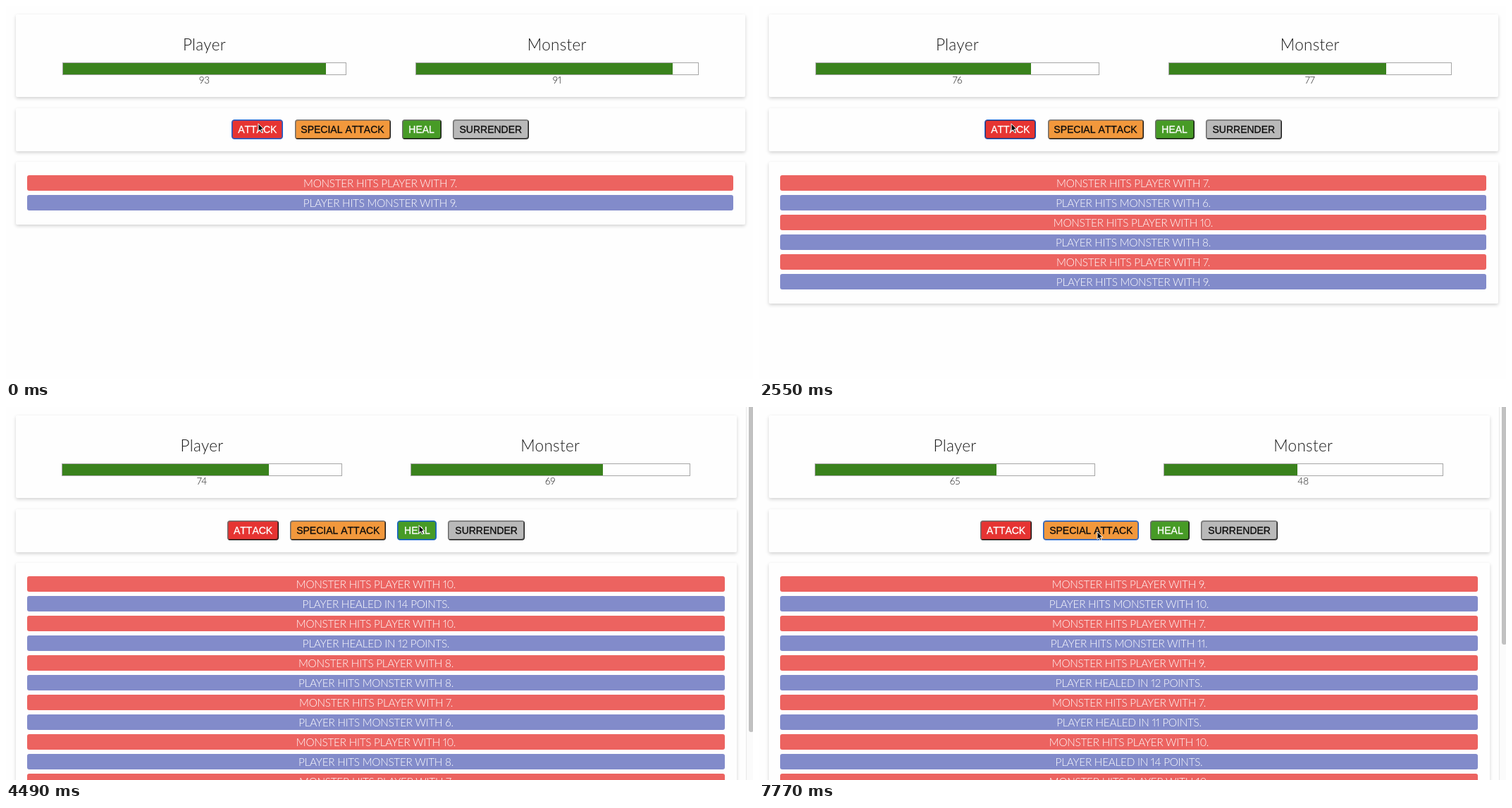
These frames come from a looping animation (1060 px wide and 529 px high, 8000 ms). An HTML page:

```html
<!DOCTYPE html>
<html lang="en">
<head>
<meta charset="utf-8">
<title>Monster battle</title>
<style>
html, body { margin: 0; width: 100%; height: 100%; overflow: hidden; background: #fefefe; }
body {
  position: relative; font-family: Lato, sans-serif; font-weight: 300;
  font-variant-numeric: proportional-nums; color: #1a1a1a;
}
#stage { position: absolute; left: 0; top: 0; width: 1060px; height: 529px; overflow: hidden; }
#stage * { box-sizing: border-box; }
.panel, .name, .bar, .health, .row, button, #cursor, #scroll, #thumb { position: absolute; }
.panel { left: 14px; background: #fefefe; border-radius: 2px; box-shadow: 0 2px 5px rgba(0, 0, 0, .18); }
.name, .health, .row { text-align: center; white-space: nowrap; }
.name { top: 40px; line-height: 29px; font-size: 22.5px; letter-spacing: .3px; }
.bar { top: 80px; height: 18px; border: 1px solid #a6a6a6; background: #fefefe; }
.fill { height: 100%; background: #3a821d; }
.health { top: 96px; line-height: 18px; font-size: 13.5px; }
button {
  --lit: #6c6c6c; --shade: #161616;
  top: 161px; height: 28px; margin: 0; padding: 0;
  border: 1px solid; border-color: var(--lit) var(--shade) var(--shade) var(--lit); border-radius: 4px;
  box-shadow: inset 1px 1px rgba(108, 108, 108, .5), inset -1px -1px rgba(22, 22, 22, .5);
  font: 14px/26px "Liberation Sans", Arial, sans-serif; font-kerning: none; color: #0c0c0c;
  -webkit-text-stroke: .3px; white-space: nowrap; outline: none;
}
button.light { color: #fff; }
button.focus { --lit: #1560d0; --shade: #1560d0; box-shadow: inset 0 0 0 1px rgba(21, 96, 208, .6); }
button.press { box-shadow: inset 0 0 0 1px rgba(20, 50, 100, .7); }
.row {
  left: 30px; height: 22px; line-height: 22px; border-radius: 3px;
  font-size: 15.3px; letter-spacing: -.25px; color: #fff; background: #828bca;
}
.row.monster { background: #ec6360; }
#scroll { left: 1050px; top: 0; width: 10px; height: 529px; background: #fbfbfb; border-left: 1px solid #e9e9e9; }
#thumb { left: 3px; top: 0; width: 7px; background: #c1c1c1; border-radius: 0 0 4px 4px; }
#cursor { width: 12px; height: 16px; overflow: visible; }
</style>
</head>
<body>
<div id="stage"></div>
<script>
const LOOP = 8000;
const ROW_TOP = 240, ROW_PITCH = 28;

// Each turn: start time, button used, amount for the player, monster's hit
const TURNS = [
  { at: 0, action: 'attack', amount: 9, hit: 7 },
  { at: 900, action: 'attack', amount: 8, hit: 10 },
  { at: 1800, action: 'attack', amount: 6, hit: 7 },
  { at: 2700, action: 'attack', amount: 8, hit: 8 },
  { at: 3600, action: 'heal', amount: 12, hit: 10 },
  { at: 4490, action: 'heal', amount: 14, hit: 10 },
  { at: 5380, action: 'heal', amount: 11, hit: 7 },
  { at: 6280, action: 'heal', amount: 12, hit: 9 },
  { at: 7020, action: 'special', amount: 11, hit: 7 },
  { at: 7770, action: 'special', amount: 10, hit: 9 },
];

const PRESSES = [[1650, 1800], [2550, 2700], [4340, 4490], [5240, 5380], [6130, 6280]];

// time, x, y
const CURSOR = [
  [0, 357, 166], [2850, 358, 166], [3000, 521, 170], [3150, 584.5, 167],
  [6430, 578, 170], [6580, 480, 177], [6720, 478.5, 175.5],
];

const BUTTONS = [
  { id: 'attack', text: 'ATTACK', x: 320.3, w: 73, color: '#e63432', light: true },
  { id: 'special', text: 'SPECIAL ATTACK', x: 409.5, w: 136, color: '#f2983c' },
  { id: 'heal', text: 'HEAL', x: 561.6, w: 56, color: '#479b26', light: true },
  { id: 'surrender', text: 'SURRENDER', x: 633.6, w: 108.5, color: '#b9b9b9' },
];

const stage = document.getElementById('stage');

function add(tag, className, parent = stage, text = '') {
  const node = document.createElement(tag);
  node.className = className;
  node.textContent = text;
  parent.append(node);
  return node;
}

function place(node, box) {
  for (const key in box) node.style[key] = box[key] + 'px';
}

const panels = [[12, 117], [145, 61], [221, 89]].map(([top, height]) => {
  const panel = add('div', 'panel');
  place(panel, { top, height });
  return panel;
});

function addFighter(title) {
  const name = add('div', 'name', stage, title);
  const bar = add('div', 'bar');
  return { name, bar, fill: add('div', 'fill', bar), health: add('div', 'health') };
}
const player = addFighter('Player');
const monster = addFighter('Monster');

const buttons = BUTTONS.map(spec => {
  const node = add('button', spec.light ? 'light' : '', stage, spec.text);
  node.style.backgroundColor = spec.color;
  node.tabIndex = -1;
  place(node, { width: spec.w });
  return { ...spec, node };
});

const log = add('div', '');
const scroll = add('div', '');
scroll.id = 'scroll';
const thumb = add('div', '', scroll);
thumb.id = 'thumb';

stage.insertAdjacentHTML('beforeend',
  `<svg id="cursor" viewBox="0 0 12 16">
    <path d="M1 .8V11.8L3.5 9.5L5.2 13.4L7.1 12.6L5.4 8.8H8.9Z"
      fill="#000" stroke="#fff" stroke-width="1" stroke-linejoin="round"/>
  </svg>`);
const cursor = document.getElementById('cursor');

function drawFighter(fighter, life, left, width) {
  for (const part of [fighter.name, fighter.bar, fighter.health]) place(part, { left, width });
  fighter.fill.style.width = life + '%';
  fighter.health.textContent = life;
}

function drawTurn(count) {
  let playerLife = 100, monsterLife = 100;
  const lines = [];
  for (const { action, amount, hit } of TURNS.slice(0, count)) {
    const healed = action === 'heal';
    if (healed) playerLife += amount;
    else monsterLife -= amount;
    playerLife -= hit;
    lines.unshift(
      ['monster', `MONSTER HITS PLAYER WITH ${hit}.`],
      ['player', healed ? `PLAYER HEALED IN ${amount} POINTS.` : `PLAYER HITS MONSTER WITH ${amount}.`]);
  }

  const bottom = ROW_TOP + lines.length * ROW_PITCH + 14;
  const scrolled = bottom > 529;
  const panelWidth = scrolled ? 1023 : 1035;
  panels.forEach(panel => place(panel, { width: panelWidth }));
  place(panels[2], { height: bottom - 221 });

  const barWidth = scrolled ? 397.3 : 402.5;
  drawFighter(player, playerLife, scrolled ? 79.4 : 80.2, barWidth);
  drawFighter(monster, monsterLife, scrolled ? 573.6 : 580.6, barWidth);

  log.replaceChildren();
  lines.forEach(([side, text], i) => {
    place(add('div', 'row ' + side, log, text),
      { top: ROW_TOP + i * ROW_PITCH, width: panelWidth - 33 });
  });

  const focused = TURNS[count - 1].action;
  for (const { id, x, node } of buttons) {
    place(node, { left: x - (scrolled ? 6.2 : 0) });
    node.classList.toggle('focus', id === focused);
  }

  scroll.style.display = scrolled ? '' : 'none';
  place(thumb, { height: 529 * 529 / (bottom + 17.5) });
}

let shownTurn = 0;

function render(time) {
  const count = TURNS.filter(turn => turn.at <= time).length;
  if (count !== shownTurn) drawTurn(shownTurn = count);

  const pressed = PRESSES.some(([from, to]) => time >= from && time < to);
  for (const { id, node } of buttons) {
    node.classList.toggle('press', pressed && id === TURNS[count - 1].action);
  }

  const [, left, top] = CURSOR.filter(step => step[0] <= time).pop();
  place(cursor, { left, top });
}

const start = performance.now();
function tick() {
  render((performance.now() - start) % LOOP);
  requestAnimationFrame(tick);
}
tick();
</script>
</body>
</html>
```
